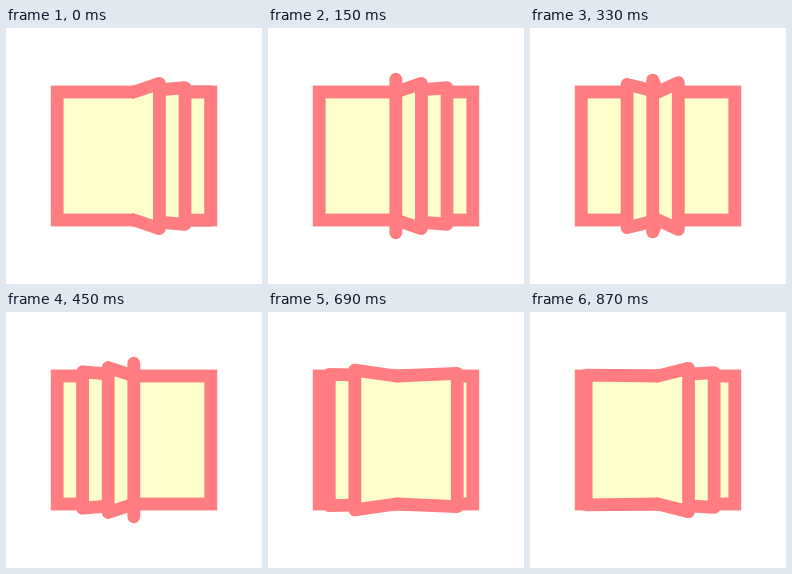
These frames come from a looping animation (256 by 256 pixels, 900 ms). An HTML page:

```html
<!DOCTYPE html>
<html lang="en">
<head>
<meta charset="utf-8">
<title>Book loader</title>
<style>
  html, body { margin: 0; width: 100%; height: 100%; overflow: hidden; background: #fff; }
  svg { display: block; width: 100vw; height: 100vh; }
  .book { fill: #ffffcb; stroke: #ff7c81; stroke-width: 5; }
  .page { stroke-linejoin: round; stroke-linecap: round; }
</style>
</head>
<body>
<svg viewBox="0 0 100 100">
  <rect class="book" x="20" y="25" width="60" height="50"/>
  <path class="book page"/>
  <path class="book page"/>
  <path class="book page"/>
</svg>
<script>
  const LOOP = 900;
  const pages = [...document.querySelectorAll('.page')];

  // The free edge travels from x = 80 to x = 20 and lifts as it passes the spine.
  function pagePath(x) {
    const lift = 5 * (1 - Math.abs(x - 50) / 30);
    return `M50 25L${x} ${25 - lift}L${x} ${75 + lift}L50 75`;
  }

  function draw(time) {
    const turn = time / LOOP;
    pages
      .map((_, i) => 80 - 60 * ((turn + i / 6) % 1))
      // Pages nearest the spine lie on top.
      .sort((a, b) => Math.abs(b - 50) - Math.abs(a - 50))
      .forEach((x, i) => pages[i].setAttribute('d', pagePath(x)));
  }

  const start = performance.now();
  function tick() {
    draw((performance.now() - start) % LOOP);
    requestAnimationFrame(tick);
  }
  draw(0);
  requestAnimationFrame(tick);
</script>
</body>
</html>
```
